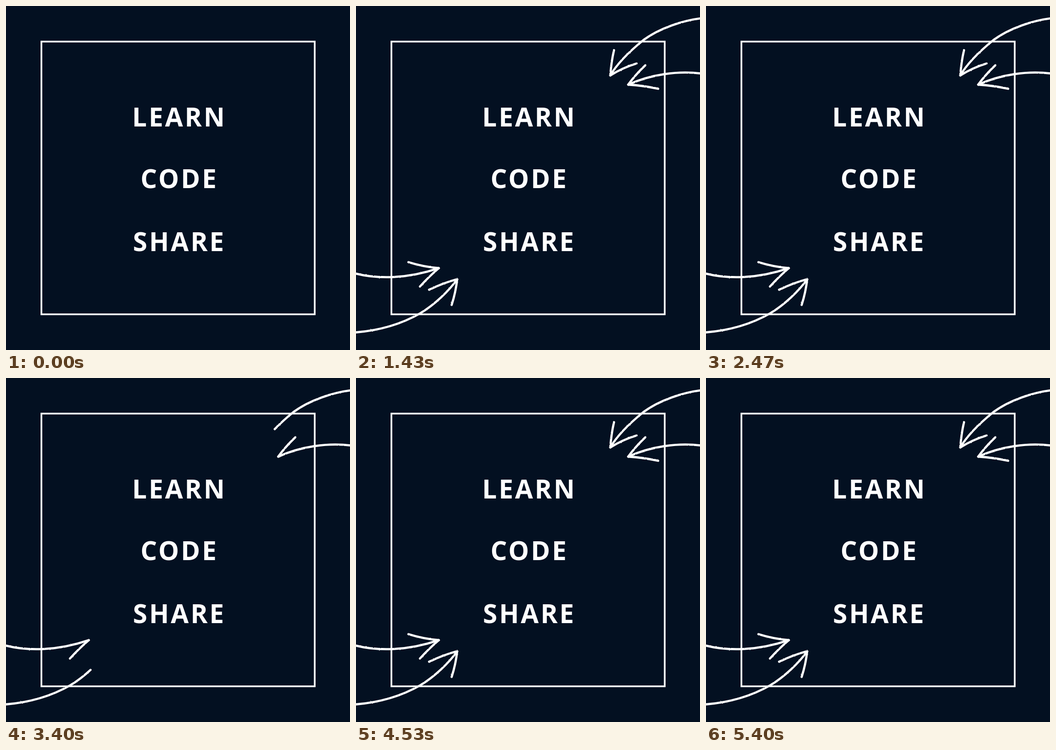
Write an HTML page that moves like this. It is 748 by 748 pixels and loops after 5.43 s.

```html
<!DOCTYPE html>
<html lang="en">
<head>
<meta charset="utf-8">
<title>Learn, code, share</title>
<style>
  html, body { margin: 0; width: 100%; height: 100%; overflow: hidden; background: #031021; }
  svg { display: block; width: 100vw; height: 100vh; }
  text { font: 700 56.5px "Open Sans", sans-serif; letter-spacing: 3.9px; text-anchor: middle; fill: #fff; }
  #frame { fill: none; stroke: #fff; stroke-width: 3.7; }
  #arrows { fill: none; stroke: #fff; stroke-width: 4.8; stroke-linecap: round; stroke-linejoin: round; }
</style>
</head>
<body>
<svg viewBox="0 0 748 748">
  <filter id="chalk" filterUnits="userSpaceOnUse" x="0" y="0" width="748" height="748" color-interpolation-filters="sRGB">
    <feTurbulence type="fractalNoise" baseFrequency="0.2" numOctaves="2" seed="4"/>
    <feDisplacementMap in="SourceGraphic" scale="2" xChannelSelector="R" yChannelSelector="G"/>
  </filter>
  <rect id="frame" x="77" y="77.4" width="594.3" height="593"/>
  <text x="377" y="262">LEARN</text>
  <text x="377" y="396">CODE</text>
  <text x="377" y="533">SHARE</text>
  <g id="arrows" filter="url(#chalk)"></g>
</svg>
<script>
const LOOP = 5430, CYCLE = LOOP / 2;

// Each stroke: start ms, end ms, then its upper right and lower left path
const strokes = [
  [30, 480, "M752 147C700 140 640 149 592 171", "M-4 581C45 594 110 594 180 570"],
  [500, 640, "M592 171Q607 150 629 129", "M180 570Q159 588 139 610"],
  [700, 840, "M592 171Q625 173 657 180", "M180 570Q146 567 114 557"],
  [180, 820, "M752 26.5C712 31 660 48 625 74C598 96 568 125 553 151", "M-4 710C50 706 100 691 140 668C170 650 202 620 220 594"],
  [900, 1060, "M553 151Q555 122 561 96", "M220 594Q217 622 208 650"],
  [1100, 1260, "M553 151Q580 134 610 125", "M220 594Q190 602 159 617"]
];

const group = document.getElementById("arrows");
const lines = strokes.flatMap(([start, end, ...paths]) => paths.map(d => {
  const path = document.createElementNS("http://www.w3.org/2000/svg", "path");
  path.setAttribute("d", d);
  group.append(path);
  const length = path.getTotalLength();
  path.style.strokeDasharray = `${length} ${length + 20}`;
  return { path, start, end, length };
}));

function draw(now) {
  const t = now % CYCLE;
  for (const { path, start, end, length } of lines) {
    const p = Math.min(1, Math.max(0, (t - start) / (end - start)));
    path.style.display = p ? "" : "none";
    path.style.strokeDashoffset = length * (1 - p);
  }
}

const begin = performance.now();
function tick() {
  draw(performance.now() - begin);
  requestAnimationFrame(tick);
}
tick();
</script>
</body>
</html>
```
